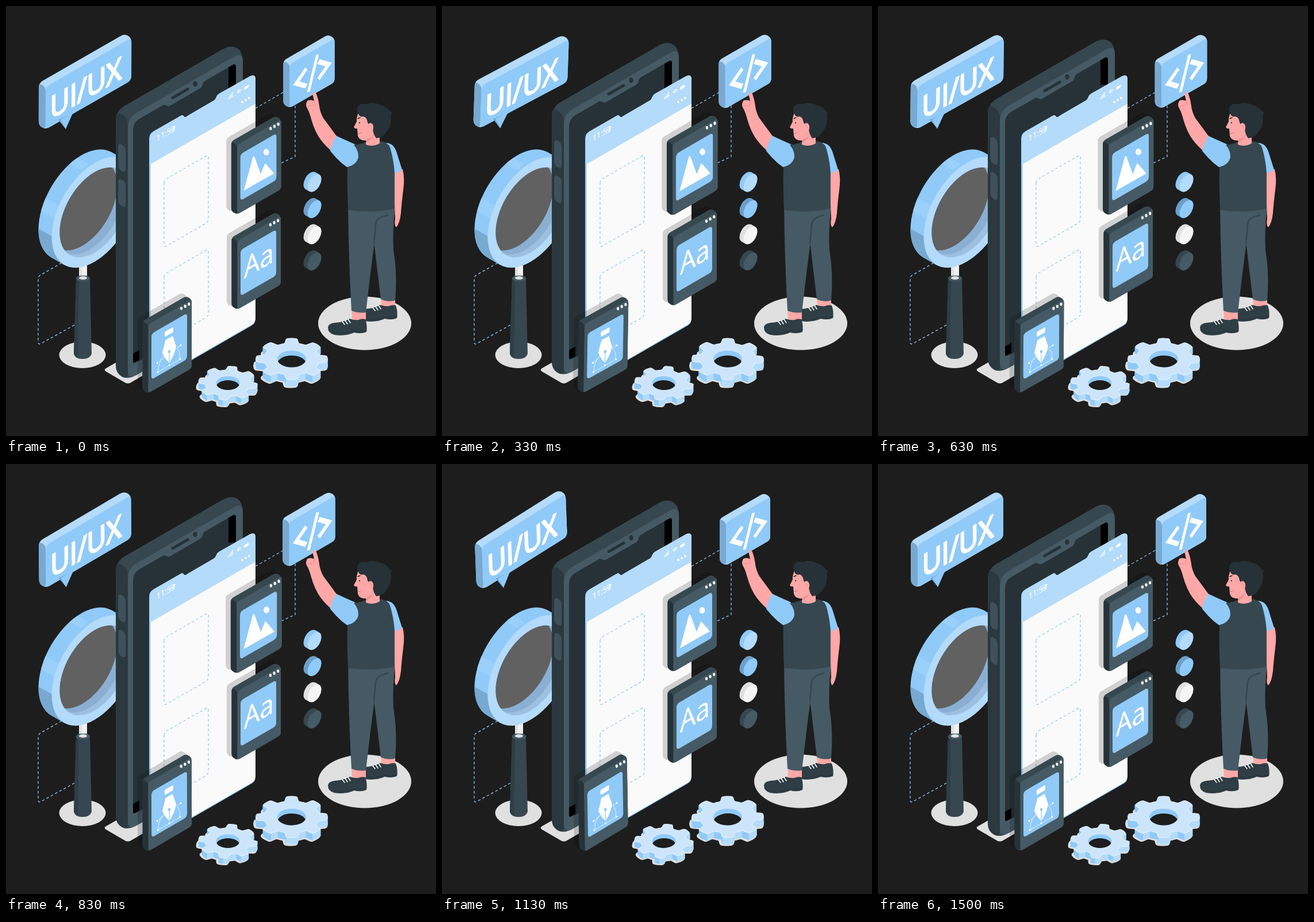
Write an HTML page that moves like this. It is 748 by 748 pixels and loops after 1.54 s.

```html
<!DOCTYPE html>
<html lang="en">
<head>
<meta charset="utf-8">
<title>Interface design</title>
<style>
html, body { margin: 0; width: 100%; height: 100%; overflow: hidden; background: #1d1d1d; }
svg { display: block; width: 100vw; height: 100vh; }
text { font-family: "Open Sans", "Noto Sans", sans-serif; fill: #fff; stroke: #fff; stroke-linejoin: round; }
</style>
</head>
<body>
<svg id="stage" viewBox="0 0 748 748"></svg>
<script>
const LOOP = 1540, LEAD = 20, K = 0.577;
const C = { ink: '#263238', dark: '#37474f', mid: '#455a64', blue: '#90caf9', pale: '#b4dbfa',
  deep: '#78a9d1', white: '#fafafa', gray: '#e0e0e0', skin: '#ffa8a7', bg: '#1d1d1d' };

const n1 = v => Math.round(v * 10) / 10;
const path = (d, fill, more = '') => `<path d="${d}" fill="${fill}" ${more}/>`;
const stroke = (d, color, w, more = '') =>
  `<path d="${d}" fill="none" stroke="${color}" stroke-width="${w}" ${more}/>`;
const line = (d, color, w) => stroke(d, color, w, 'stroke-linecap="round" stroke-linejoin="round"');
const dash = d => stroke(d, C.blue, 1.3, 'stroke-dasharray="4.5 4"');
const oval = (x, y, rx, ry, fill, more = '') =>
  `<ellipse cx="${x}" cy="${y}" rx="${rx}" ry="${ry}" fill="${fill}" ${more}/>`;
const group = (id, body) => `<g id="${id}">${body}</g>`;
const clip = (id, shape, body) => `<clipPath id="${id}">${shape}</clipPath><g clip-path="url(#${id})">${body}</g>`;
const iso = (x, y, body) => `<g transform="matrix(.866 -.5 0 1 ${x} ${y})">${body}</g>`;
const shift = (p, dx, dy) => p.map(([x, y]) => [x + dx, y + dy]);

// Closed polygon with rounded corners
function round(pts, r) {
  const toward = (a, b) => {
    const len = Math.hypot(b[0] - a[0], b[1] - a[1]) || 1, k = Math.min(r, len / 2) / len;
    return [n1(a[0] + (b[0] - a[0]) * k), n1(a[1] + (b[1] - a[1]) * k)];
  };
  return pts.map((p, i) => {
    const a = toward(p, pts[(i + pts.length - 1) % pts.length]);
    const b = toward(p, pts[(i + 1) % pts.length]);
    return `${i ? 'L' : 'M'}${a}Q${p[0]} ${p[1]} ${b}`;
  }).join('') + 'Z';
}

// Upright isometric rectangle from its top left corner
const pane = (x, y, w, h) => [[x, y], [x + w, y - K * w], [x + w, y - K * w + h], [x, y + h]];

function box(x, y, w, h, d, r, side, top, front) {
  const f = pane(x, y, w, h), b = shift(f, -d, -K * d);
  return path(round([b[3], b[0], b[1], f[1], f[2], f[3]], r), top) +
    path(round([b[0], f[0], f[3], b[3]], Math.min(r, d * 0.6)), side) +
    path(round(f, r), front);
}

// Disc standing in the same plane as the panes, and the rim behind it
const disc = (x, y, r, fill) => iso(x, y, `<circle r="${r}" fill="${fill}"/>`);
function rim(x, y, r, d, fill) {
  let s = '';
  for (let i = d; i > 0; i--) s += disc(n1(x - i), n1(y - i * K), r, fill);
  return s;
}

function magnifier() {
  return oval(133, 607, 40.5, 23, C.gray) +
    path('M127 448H141V478H127Z', '#f0f0f0') + path('M127 448H132V478H127Z', C.gray) +
    path('M122 474Q122 469 134 469Q146 469 146 474L149 605Q146 614 133 614Q120 614 118 605Z', C.dark) +
    path('M122 474L127 478L125 610Q119 608 118 605Z', '#2f3d44') +
    oval(134, 474, 12, 5, C.mid) + oval(134, 473, 7, 3, C.gray) +
    rim(154, 359, 86, 23, C.blue) +
    clip('shade', '<path d="M40 378L90 407L135 470H40Z"/>', rim(154, 359, 86, 23, C.deep)) +
    clip('shine', '<path d="M50 350L90 373L96 350L60 329ZM90 262L130 285L142 275L102 252Z"/>',
      rim(154, 359, 86, 23, '#9bd0fa')) +
    disc(154, 359, 86, C.pale) +
    clip('hole', '<circle r="70" transform="matrix(.866 -.5 0 1 154 359)"/>',
      disc(154, 359, 71, '#9dbfe0') + disc(145, 354, 70, '#8bafd3') + disc(133, 347, 70, '#616161'));
}

function phone() {
  const button = y => {
    const p = [[195, y], [208, y + 7], [208, y + 53], [195, y + 46]];
    return path(round(shift(p, -1.5, -1), 7), C.ink) + path(round(p, 7), '#3e5059');
  };
  return box(212, 195, 200, 456, 21, 18, '#2b393f', C.dark, C.mid) +
    path(round(pane(221, 203, 179, 421), 13), C.ink) +
    path('M387 107L396 102Q400 101 400 106V150H387Z', '#000') +
    path('M221 605L232 599V616L224 621Q221 622 221 618Z', '#000') +
    path('M274 172L280 174Q283 176 287 173L337 144Q342 141 342 136L345 131Z', C.mid) +
    line('M290 160L316 145', C.ink, 5) + oval(329, 136, 3.7, 4.6, C.ink) + button(238) + button(299);
}

function screen() {
  const top = x => `M${x} 231Q${x} 222 257 218L304 191Q308 189 309 192Q312 195 316 191L359 166Q365 163 366 158Q367 155 371 152.5L424 122.5Q434 117 434 128`;
  const panel = (x, end) => `${top(x)}V${543 - end}Q434 ${552 - end} 428 ${555.5 - end}L257 ${654 - end}Q${x} ${657 - end} ${x} ${650 - end}Z`;
  let s = path(panel(249, 0), C.blue) + path(panel(251.5, 1.5), C.white) +
    path(top(250) + 'V170L250 276Z', C.pale) +
    iso(262, 236, '<text font-size="14.5" stroke-width=".1">11:53</text>') +
    line('M285 217L294 209L291 219L289 216Z', '#fff', 1);
  for (let i = 0; i < 4; i++) s += line(`M${387 + i * 2.3} ${162 - i * 1.3}v${-2 - i * 2}`, '#fff', 1.3);
  s += line('M402 150Q405 144 409 146M403.5 151.5Q406 148 408 149', '#fff', 1.3) +
    path(round(pane(414.5, 141, 7.5, 5), 1), '#fff');
  for (let i = 0; i < 3; i++) s += oval(411 + i * 6, 167 - i * 3.4, 1.7, 2.1, '#fff');
  return s + dash(round(pane(275, 303, 77, 117), 5)) + dash(round(pane(275, 467, 77, 117), 5));
}

// All three cards share the geometry of the upper one
function card(dx, dy, icon) {
  const shadow = round([[384, 352], [384, 231], [460, 187], [470, 192], [470, 312], [394, 357]], 5);
  let s = path(shadow, '#000', 'opacity=".17"') +
    box(402.5, 242, 75.5, 119.5, 10, 5, C.ink, C.dark, C.mid) +
    path(round(pane(408, 258, 62, 80), 6), C.blue);
  for (let i = 0; i < 3; i++) s += oval(460 + i * 6.6, 214 - i * 3.7, 2.1, 2.8, '#fff');
  return `<g transform="translate(${dx} ${dy})">${s}</g>` + icon;
}

const picture = path('M414 320.5L429.5 263Q431 260 432.5 263L443 292L449.500 275.5Q451 273 452.500 275.5L466 291Z', '#fff') +
  oval(452.5, 254.5, 4.8, 5.6, '#fff');
const letters = iso(414, 475, '<text font-size="50" stroke-width=".4">Aa</text>');
const pen = path(round(pane(276, 567, 15, 9), 2), '#fff') +
  path('M277.5 581L290 574L296 592Q294 605 284 621Q274 611 272 603Z', '#fff') +
  line('M284 619V602', C.blue, 1.2) + oval(284, 601, 2.2, 2.8, C.blue) +
  line('M264 637L303 614M265 636Q264 620 274 611M302 614Q304 600 297 596M263 621L274 611M297 595L304 590', '#fff', 0.7) +
  [[264, 637], [303, 614], [284, 625], [263, 621], [304, 590]].map(([x, y]) => oval(x, y, 1.4, 1.7, '#fff')).join('');

const bubble = box(69, 141, 149, 74, 12, 8, C.deep, C.pale, C.blue) +
  path('M91 198L104 214L109 190Z', C.deep) + path('M95 198L104 214L117 185Z', C.blue) +
  iso(77, 197.5, '<text font-size="53.5" stroke-width="2.8">UI/UX</text>');

const code = box(494, 101.5, 77, 75, 11, 6, C.deep, C.pale, C.blue) +
  iso(533, 118, stroke('M-12 -15L-32 0L-12 15M12 -15L32 0L12 15', '#fff', 7.5) + stroke('M-8 27L10 -28', '#fff', 6));

function coins() {
  return [[C.pale, C.blue], [C.blue, '#6b9fca'], ['#f5f5f5', C.gray], [C.mid, C.dark]]
    .map(([front, side], i) => rim(536.6, 308 + i * 45.5, 13.9, 7, side) + disc(536.6, 308 + i * 45.5, 13.9, front)).join('');
}

function gearShape(cx, cy, R, turn) {
  const pts = [], step = Math.PI / 4;
  const put = (r, a) => pts.push([n1(cx + r * Math.cos(a)), n1(cy + r * K * Math.sin(a))]);
  for (let i = 0; i < 8; i++) {
    const a = i * step + turn;
    put(R * 0.78, a - step * 0.32); put(R, a - step * 0.2);
    put(R * 1.01, a); put(R, a + step * 0.2);
    put(R * 0.78, a + step * 0.32); put(R * 0.78, a + step * 0.5);
  }
  return pts;
}

function gear(id, cx, cy, R, h, turn) {
  const pts = gearShape(cx, cy, R, turn), q = R / 62;
  const under = path(round(shift(pts, -2, h), 2), C.gray, `stroke="${C.gray}" stroke-width="5" stroke-linejoin="round"`);
  let s = '';
  pts.map((p, i) => [p, pts[(i + 1) % pts.length]])
    .filter(([a, b]) => b[0] < a[0])
    .sort((e, g) => e[0][1] + e[1][1] - g[0][1] - g[1][1])
    .forEach(([a, b]) => {
      const tone = b[1] < a[1] - 1 ? C.blue : C.pale;
      s += path(`M${a}L${b}v${h}L${a[0]} ${a[1] + h}Z`, tone, `stroke="${tone}" stroke-width=".5"`);
    });
  const hole = fill => oval(cx, cy, 25 * q, 14.5 * q, fill);
  s += path(round(pts, 2.5), '#cde5fb', 'stroke="#e6f3fe" stroke-width="1"') + hole(C.blue) +
    clip(id + 'Hole', hole(C.bg), oval(cx, cy + h * 0.7, 25 * q, 14.5 * q, C.bg));
  return under + group(id, s);
}

function man() {
  const shoe = (x, y) => `<g transform="translate(${x} ${y})">` +
    path('M0 15Q1 8 12 7Q27 6 38 0Q47 3 53 2Q60 -1 65 1Q69 12 67 23Q57 27 46 24Q30 31 11 28Q0 25 0 15Z', '#2f3d44') +
    line('M1 20Q6 25 16 25Q34 26 46 21Q56 24 67 20', C.ink, 1) +
    line('M25 5L29 10M30 3L34 9M35 1L39 7', '#fff', 1.6) + '</g>';
  return oval(624, 552, 81, 46.5, C.gray) +
    path('M652 505H677V521Q664 528 653 520Z', C.skin) + shoe(613, 520) +
    path('M601 526H626V545Q614 552 602 544Z', C.skin) + shoe(560, 544) +
    // trousers
    path('M640 350H677Q672 390 674 425Q681 465 677 512Q665 516 652 510Q646 460 640 410Z', C.mid) +
    path('M595 348H666L645 382Q639 425 634 465L626 533Q613 535 601 530Q596 440 595 348Z', C.mid) +
    line('M664 364Q646 367 643 379Q642 395 640 412', C.dark, 2.6) +
    // lowered arm
    path('M675 287L690 284Q694 300 691 320Q688 345 687 360Q685 378 679 385Q675 383 677 370L676 345Z', C.skin) +
    path('M660 238Q675 238 680 256L689 285Q682 290 675 291Z', C.blue) +
    // raised arm
    path('M577 229L552 195Q546 184 545 174Q544 164 540 153Q537 147 533 152L536 165Q528 162 524 165Q520 173 524 178Q528 185 531 197Q537 218 547 232Q556 244 567 253Z', C.skin) +
    line('M525 174L534 173Q538 170 536 165', '#f28f8f', 1.2) +
    path('M575 226Q592 234 606 240Q617 252 612 272Q608 284 600 284Q583 276 564 252Q567 236 575 226Z', C.blue) +
    path('M605 242Q618 240 628 236L650 235Q664 236 668 246Q675 270 676 291V352Q648 361 595 355Q593 310 594 280Q610 276 613 263Q613 250 605 242Z', C.dark) +
    // head
    path('M627 226L650 218V239Q638 246 626 241Z', C.skin) +
    path('M614 183Q609 195 610 201L605 211Q607 214 611 213L612 226Q615 235 627 234Q638 232 644 222L647 200L632 182Z', C.skin) +
    path('M627 232Q635 230 639 224Q636 234 627 237Z', '#f28f8f') +
    path('M613 188Q609 180 613 174Q618 168 627 171Q639 166 651 172Q661 174 669 184L671 186L669 190Q672 208 661 220Q656 229 644 230Q638 222 638 212L632 207L629 203Q628 194 622 192Q616 194 613 188Z', C.ink) +
    oval(634, 211, 5.2, 7.5, C.skin) + line('M632 209Q636 207 636 213', '#f28f8f', 1) +
    line('M612 196L616 194', C.ink, 1.4) + oval(615, 203, 0.9, 1.5, C.ink) +
    line('M613 222Q616 222 618 220', '#c96e70', 1);
}

const stage = document.getElementById('stage');
stage.innerHTML = `<rect width="748" height="748" fill="${C.bg}"/>` +
  dash('M119 555L61 587Q56 590 56 584V475Q56 470 60 468L135 425') +
  dash('M434 178L498 141Q503 139 503 144V262L479 273') +
  magnifier() +
  path(round([[169, 633], [260, 581], [302, 606], [212, 658]], 6), C.gray) +
  group('phone', phone()) + screen() +
  group('picture', card(0, 0, picture)) +
  group('letters', card(0, 167, letters)) +
  group('pen', card(-155, 312, pen)) +
  group('bubble', bubble) + group('code', code) + coins() +
  gear('big', 497, 614, 62, 12, 0) + gear('small', 386, 656, 51, 10, 0.16) + man();

// Linear interpolation through [position, value] stops
function mix(stops, p) {
  const i = Math.max(1, stops.findIndex(s => s[0] >= p));
  const [a, u] = stops[i - 1], [b, v] = stops[i];
  return u + (v - u) * (p - a) / (b - a);
}
const FLOAT = [[0, 0], [0.5, -15], [1, 0]];
const BEAT = [[0, 1], [0.1, 1.1], [0.3, 1], [0.5, 1.05], [0.7, 1], [1, 1]];
const SWAY = [[0, 0], [0.25, 1], [0.75, -1], [1, 0]];

const set = (id, value) => document.getElementById(id).setAttribute('transform', value);
const scaleAt = (id, s, x, y) => set(id, `translate(${x} ${y}) scale(${s}) translate(${-x} ${-y})`);
const turnAt = (id, deg, x, y) => set(id, `rotate(${deg} ${x} ${y})`);

function draw(t) {
  const p = ((t + LEAD) % LOOP) / LOOP;
  const lift = mix(FLOAT, p), beat = mix(BEAT, p), sway = mix(SWAY, p);
  set('phone', `translate(0 ${lift})`);
  set('letters', `translate(0 ${lift})`);
  scaleAt('picture', beat, 435, 279);
  scaleAt('code', beat, 527, 114.5);
  turnAt('bubble', sway * 2.2, 137, 134);
  turnAt('pen', sway, 280, 591);
  turnAt('big', sway, 495, 620);
  turnAt('small', sway, 385, 660);
}

const start = performance.now();
function tick() {
  draw(performance.now() - start);
  requestAnimationFrame(tick);
}
draw(0);
requestAnimationFrame(tick);
</script>
</body>
</html>
```
